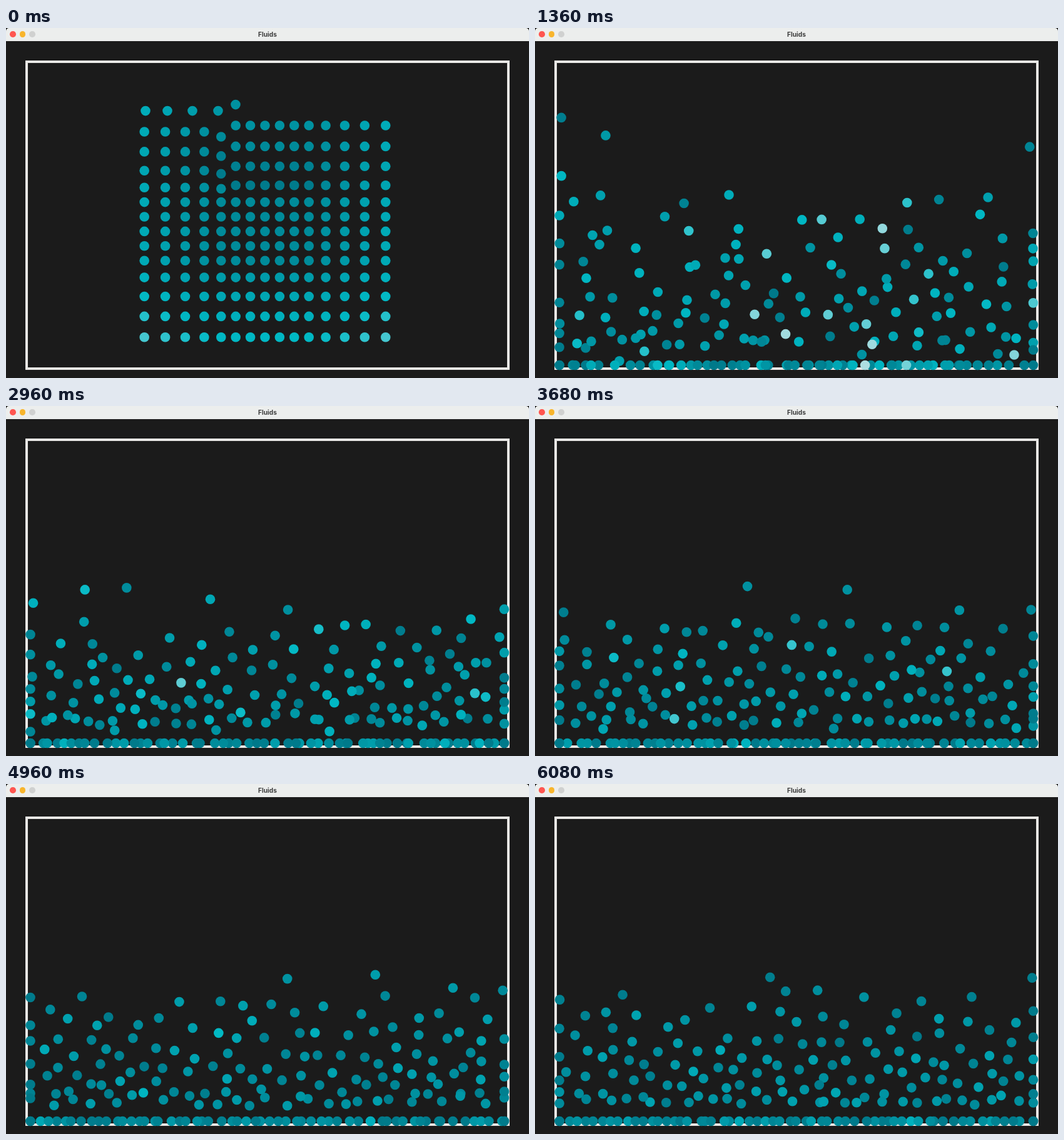
An HTML page with a canvas that plays this animation: 836x560 px, repeating every 6.16 s.

```html
<!DOCTYPE html>
<html lang="en">
<head>
<meta charset="utf-8">
<title>Fluids</title>
<style>
  html, body { margin: 0; width: 100%; height: 100%; overflow: hidden; background: #1b1b1b; }
  canvas { position: absolute; top: 0; left: 0; }
  header {
    position: absolute; top: 0; left: 0; width: 836px; height: 21px;
    background: #eceeed; border-radius: 5px 5px 0 0; color: #3c3c3c;
    font: 700 10.2px/20px Inter, Roboto, sans-serif; text-align: center;
  }
  i { position: absolute; top: 5.2px; width: 9.6px; height: 9.6px; border-radius: 50%; }
</style>
</head>
<body>
<canvas width="836" height="560"></canvas>
<header>
  <i style="left:6.2px;background:#ff5650"></i>
  <i style="left:21.7px;background:#f8b52c"></i>
  <i style="left:37.2px;background:#d0d1d0"></i>
  Fluids
</header>
<script>
const ctx = document.querySelector('canvas').getContext('2d');
const FRAME_MS = 80, FRAMES = 77, SUBSTEPS = 16, TIME_SCALE = 2.2;
const DT = TIME_SCALE * FRAME_MS / 1000 / SUBSTEPS;
const GRAVITY = 350, REACH = 45, STIFFNESS = 2100;
const DRAG = 0.0016, BOUNCE = 0.2, JITTER = 5;
const BOX = { left: 39, right: 796.5, top: 60, bottom: 539.5 };
const GAP = 23.4, COLS = 15, ROWS = 14;
const SPREAD = [29, 19, 10.5, 3.5];   // outward shift of the layers nearest an edge

let seed = 7;
const random = () => (seed = (seed * 16807) % 2147483647) / 2147483647;
const noise = size => (random() + random() + random() - 1.5) * size;
const shift = (before, after) => (SPREAD[after] || 0) - (SPREAD[before] || 0);
const speedOf = d => Math.sign(d) * 120 * Math.sqrt(Math.abs(d) / 29);

// A block that has just begun to burst outwards while it falls.
function makeParticles() {
  const list = [];
  const topX = [223, 258, 298, 339, 367], dent = [0, 8, 7, 5, 2];
  for (let r = 0; r < ROWS; r++) {
    for (let c = 0; c < (r ? COLS : 5); c++) {
      const dx = shift(c, COLS - 1 - c);
      const dy = shift(c < 5 ? r : r - 1, ROWS - 1 - r);
      let x = 414 + GAP * (c - 7) + dx;
      let y = 302 + GAP * (r - 6) + dy;
      if (!r) {
        x = topX[c];
        if (c === 4) y -= 10;
      } else if (c === 4) {
        y += dent[r] || 0;
      }
      list.push({ x, y, vx: speedOf(dx), vy: 50 + speedOf(dy), ax: 0, ay: 0 });
    }
  }
  return list;
}

function repel(a, b) {
  const dx = a.x - b.x, dy = a.y - b.y, d2 = dx * dx + dy * dy;
  if (d2 >= REACH * REACH) return;
  const d = Math.sqrt(d2) || 0.01;
  const f = STIFFNESS * (1 - d / REACH) / d;
  a.ax += f * dx; a.ay += f * dy;
  b.ax -= f * dx; b.ay -= f * dy;
}

function collide(p, axis, vel, min, max) {
  if (p[axis] < min || p[axis] > max) {
    p[axis] = Math.max(min, Math.min(max, p[axis]));
    p[vel] *= -BOUNCE;
  }
}

function step(list) {
  for (const p of list) {
    const drag = DRAG * Math.hypot(p.vx, p.vy);
    p.ax = -drag * p.vx;
    p.ay = GRAVITY - drag * p.vy;
  }
  for (let i = 0; i < list.length; i++)
    for (let j = 0; j < i; j++) repel(list[i], list[j]);
  for (const p of list) {
    p.vx += p.ax * DT + noise(JITTER);
    p.vy += p.ay * DT + noise(JITTER);
    p.x += p.vx * DT; p.y += p.vy * DT;
    collide(p, 'x', 'vx', BOX.left, BOX.right);
    collide(p, 'y', 'vy', BOX.top, BOX.bottom);
  }
}

// Slow is dark teal, medium is cyan, fast is white.
function colour(speed) {
  const mix = (a, b, k) => a.map((v, i) => Math.round(v + (b[i] - v) * k));
  const cyan = [0, 184, 196];
  const rgb = speed < 170
    ? mix([0, 120, 137], cyan, speed / 170)
    : mix(cyan, [236, 236, 236], Math.min(1, (speed - 170) / 130));
  return `rgb(${rgb})`;
}

const snapshot = list =>
  list.map(p => ({ x: p.x, y: p.y, fill: colour(Math.hypot(p.vx, p.vy)) }));

function simulate() {
  const list = makeParticles(), frames = [snapshot(list)];
  for (const p of list) {
    p.vx += noise(160);
    p.vy += noise(120);
    if (random() < 0.1) {
      p.vy -= 100 + 250 * random();
      p.vx += noise(200);
    }
  }
  while (frames.length < FRAMES) {
    for (let s = 0; s < SUBSTEPS; s++) step(list);
    frames.push(snapshot(list));
  }
  return frames;
}

const frames = simulate();

function draw() {
  ctx.fillStyle = '#1b1b1b';
  ctx.fillRect(0, 0, 836, 560);
  ctx.strokeStyle = '#e9e8e6';
  ctx.lineWidth = 4;
  ctx.strokeRect(33, 54, 770, 491);
  for (const p of frames[Math.floor(performance.now() / FRAME_MS) % FRAMES]) {
    ctx.fillStyle = p.fill;
    ctx.beginPath();
    ctx.arc(p.x, p.y, 7.8, 0, 7);
    ctx.fill();
  }
  requestAnimationFrame(draw);
}
draw();
</script>
</body>
</html>
```
